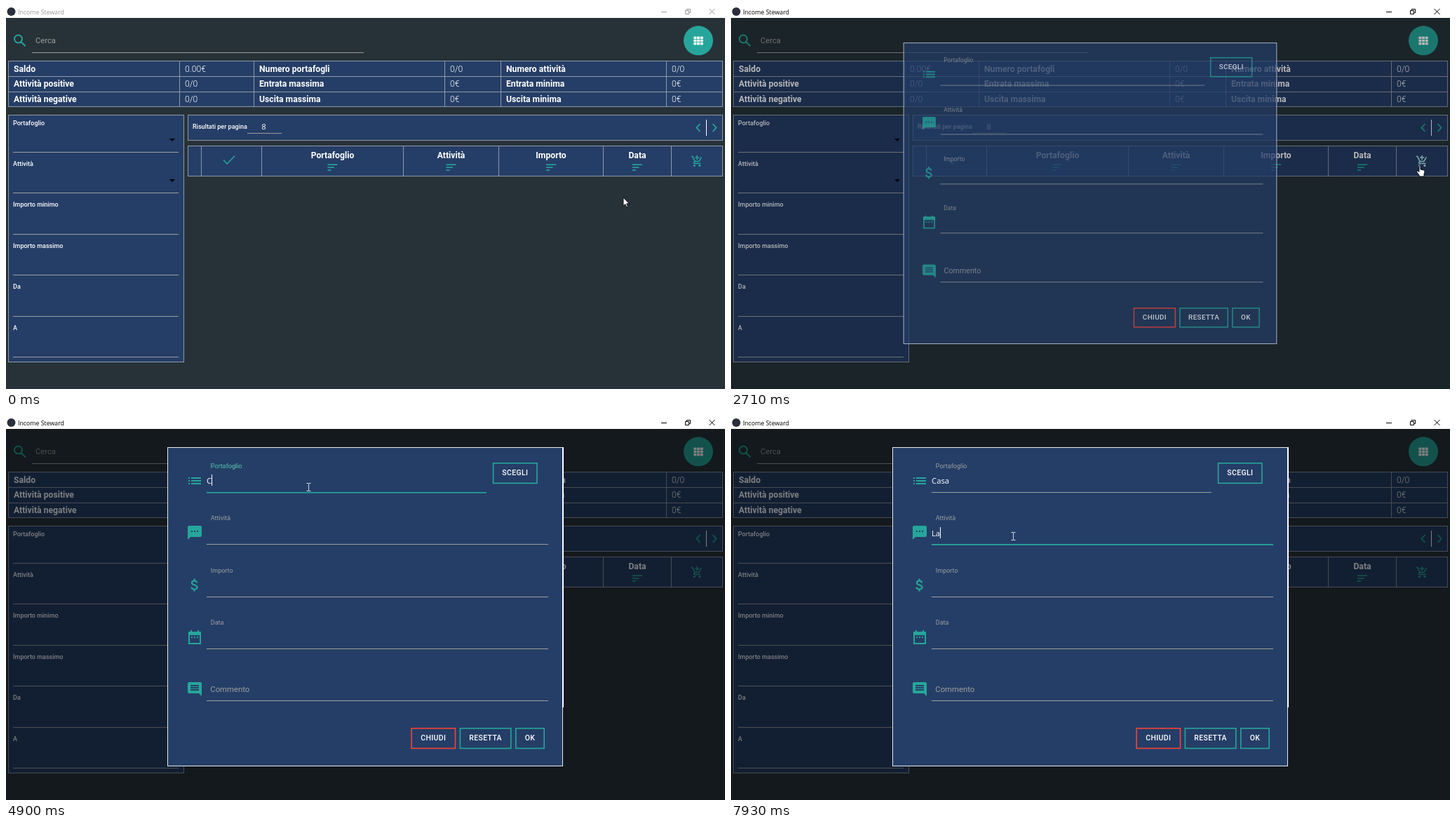
An HTML page with a canvas that plays this animation: 1025 px wide and 546 px high, repeating every 8000 ms.

```html
<!DOCTYPE html>
<html lang="it">
<head>
<meta charset="utf-8">
<title>Income Steward</title>
<style>
  html, body { margin: 0; width: 100%; height: 100%; overflow: hidden; background: #263238; }
  canvas { display: block; }
</style>
</head>
<body>
<canvas id="stage" width="1025" height="546"></canvas>
<script>
const ctx = document.getElementById('stage').getContext('2d');
const LOOP = 8000;
const BG = '#263238', BLUE = '#253e67', TEAL = '#26a69a', EDGE = '#9199a7', GREY = '#9e9e9e';
const ROBOTO = 'Roboto, sans-serif', OPEN = '"Open Sans", sans-serif';

const clamp = v => Math.max(0, Math.min(1, v));
const ramp = (t, from, to) => clamp((t - from) / (to - from));

function rect(x, y, w, h, color) {
  ctx.fillStyle = color;
  ctx.fillRect(x, y, w, h);
}
function text(s, x, y, font, color, align = 'left', spacing = 0) {
  ctx.font = font;
  ctx.fillStyle = color;
  ctx.textAlign = align;
  ctx.letterSpacing = spacing + 'px';
  ctx.fillText(s, x, y);
  ctx.letterSpacing = '0px';
}
function stroke(d, x, y, width, color) {
  ctx.save();
  ctx.translate(x, y);
  ctx.lineWidth = width;
  ctx.strokeStyle = color;
  ctx.stroke(new Path2D(d));
  ctx.restore();
}
function fill(d, x, y, color, outline) {
  ctx.save();
  ctx.translate(x, y);
  const path = new Path2D(d);
  ctx.fillStyle = color;
  ctx.fill(path);
  if (outline) {
    ctx.strokeStyle = outline;
    ctx.lineWidth = 0.9;
    ctx.stroke(path);
  }
  ctx.restore();
}
function disc(x, y, r, color) {
  ctx.fillStyle = color;
  ctx.beginPath();
  ctx.arc(x, y, r, 0, 7);
  ctx.fill();
}
// Blue box with a one pixel edge and inner column lines
function panel(x, y, right, bottom, columns = [], edge = EDGE) {
  rect(x, y, right - x, bottom - y, BLUE);
  ctx.strokeStyle = edge;
  ctx.lineWidth = 1;
  ctx.strokeRect(x + 0.5, y + 0.5, right - x - 1, bottom - y - 1);
  for (const c of columns) rect(c, y, 1, bottom - y, edge);
}

function titleBar(active) {
  const ink = active ? '#000' : '#999';
  rect(0, 0, 1025, 17, '#fff');
  disc(7.5, 8, 6, '#2b2e3b');
  text('Income Steward', 17, 12, '8.8px ' + OPEN, ink);
  rect(934, 8, 8, 1, ink);
  stroke('M968.500 6.500h5v5h-5zM970.500 6v-1.500h5v5h-1.500', 0, 0, 1, ink);
  stroke('M1002.500 4l8 8m0-8l-8 8', 0, 0, 1, ink);
}

function summary() {
  const rows = [
    ['Saldo', '0.00€', 'Numero portafogli', '0/0', 'Numero attività', '0/0'],
    ['Attività positive', '0/0', 'Entrata massima', '0€', 'Entrata minima', '0€'],
    ['Attività negative', '0/0', 'Uscita massima', '0€', 'Uscita minima', '0€']
  ];
  const xs = [11, 255, 361, 633, 713, 949];
  panel(3, 78, 1022, 144, [247, 353, 625, 705, 941]);
  rows.forEach((row, r) => {
    if (r) rect(3, 78 + r * 22, 1019, 1, EDGE);
    row.forEach((s, c) => text(s, xs[c], 93.5 + r * 21.7, (c % 2 ? '300' : '700') + ' 12.2px ' + ROBOTO, '#fff'));
  });
}

function filters() {
  panel(3, 155, 254, 508);
  ['Portafoglio', 'Attività', 'Importo minimo', 'Importo massimo', 'Da', 'A'].forEach((s, i) => {
    const y = i * 58.4;
    text(s, 10, 169.5 + y, '500 9px ' + ROBOTO, '#fff');
    rect(10, Math.round(208 + y), 236, 1, GREY);
    if (i < 2) fill('M0 0h8l-4 4z', 233, Math.round(189 + y), '#000');
  });
}

function cart(color) {
  ctx.save();
  ctx.translate(976, 212.3);
  ctx.scale(0.76, 0.76);
  stroke('M1 3H3.600L8 12H15.600L20.300 3.900M7.600 12L6 15.200Q6 16 7 16H19M12 1V9M8 5H16', 0, 0, 2, color);
  disc(7, 20, 2, color);
  disc(17, 20, 2, color);
  ctx.restore();
}

function page(hover) {
  rect(0, 17, 1025, 529, BG);
  stroke('M15 9.500a5.500 5.500 0 1 1-11 0a5.500 5.500 0 1 1 11 0M13.600 13.600L19.700 19.700', 8, 37.5, 2, TEAL);
  text('Cerca', 42, 53, '11.2px ' + ROBOTO, GREY);
  rect(37, 66, 473, 1, GREY);
  disc(987, 49.3, 21, TEAL);
  for (let i = 0; i < 9; i++) rect(980.4 + (i % 3) * 4.7, 43.6 + (i / 3 | 0) * 4.2, 3.9, 3.4, '#fff');

  summary();
  filters();

  panel(259, 155, 1022, 192);
  text('Risultati per pagina', 266, 174.8, '500 9px ' + ROBOTO, '#fff');
  text('8', 367.5, 175.5, '11.3px ' + OPEN, '#fff', 'center');
  rect(344, 181, 49, 1, GREY);
  stroke('M989.500 168l-5 5.500l5 5.500M1007.500 168l5 5.500l-5 5.500', 0, 0, 1.8, TEAL);
  rect(998, 162, 1, 23, '#fff');

  panel(259, 199, 1022, 243, [278, 364, 566, 702, 851, 948]);
  stroke('M310 219.500l5.300 5.500l11-11.500', 0, 0, 1.5, TEAL);
  [['Portafoglio', 465.5], ['Attività', 634.5], ['Importo', 777], ['Data', 900]].forEach(([s, x]) => {
    text(s, x, 216.5, '700 12.2px ' + ROBOTO, '#fff', 'center');
    [14, 9.5, 5].forEach((w, i) => rect(x - 7, 225.4 + i * 3.9, w, 1.6, TEAL));
  });
  cart(`rgb(${38 + 140 * hover},${166 + 69 * hover},${154 + 88 * hover})`);
}

const bubble = 'M20 2H4Q2 2 2 4V22L6 18H20Q22 18 22 16V4Q22 2 20 2z';

function modalIcons() {
  const x = 257;
  for (let i = 0; i < 3; i++) {
    rect(x + 3, 86 + i * 4, 2, 2, TEAL);
    rect(x + 7, 86 + i * 4, 14, 2, TEAL);
  }
  fill(bubble, x, 153, TEAL);
  stroke('M15 9C15 5 8 5 8 9C8 13 15.500 11 15.500 15.300C15.500 19 7.500 19 7.500 15M11.500 3V6M11.500 18V21', x, 227.5, 2.2, TEAL);
  stroke('M4 5H20V21H4z', x, 302, 2, TEAL);
  fill('M3 4H21V9H3zM6 2H8V5H6zM16 2H18V5H16z', x, 302, TEAL);
  for (let i = 0; i < 3; i++) {
    rect(x + 7 + i * 4, 162, 2, 2, BLUE);
    rect(x + 7 + i * 4, 313, 2, 2, TEAL);
  }
  ctx.save();
  ctx.translate(x + 24, 376);
  ctx.scale(-1, 1);
  fill(bubble, 0, 0, TEAL);
  for (let i = 0; i < 3; i++) rect(6, 6 + i * 3, 12, 2, BLUE);
  ctx.restore();
}

function button(s, x, y, w, color) {
  ctx.strokeStyle = color;
  ctx.lineWidth = 1.6;
  ctx.strokeRect(x + 0.8, y + 0.8, w - 1.6, 28.6);
  text(s, x + w / 2, y + 18.2, '500 10.5px ' + ROBOTO, '#fff', 'center', 0.35);
}

const TYPING = [[4900, 'C'], [5200, 'Ca'], [5350, 'Cas'], [5520, 'Casa']];
const TYPING2 = [[7760, 'L'], [7930, 'La']];
const CARET = [[4130, 4580], [4900, 5990], [6520, 7540], [7760, LOOP]];
const typed = (t, steps) => steps.reduce((s, [at, v]) => t >= at ? v : s, '');

function field(value, y, caret) {
  text(value, 286, y, '11.3px ' + OPEN, '#fff');
  if (caret) rect(286 + Math.round(ctx.measureText(value).width), y - 13, 1, 16, '#fff');
}

function modal(t) {
  const p = 1 - (1 - ramp(t, 2631, 2861)) ** 3;
  if (!p) return;
  const size = 0.8 + 0.2 * p;
  const focused = ramp(t, 4070, 4350), moved = ramp(t, 6940, 7220);
  const first = focused * (1 - moved);
  const dx = t >= 4130 ? 0.8 : 0;

  ctx.save();
  ctx.globalAlpha = p;
  ctx.translate(512, 270.5 - 12.5 * (1 - p));
  ctx.scale(size, size);
  ctx.translate(-512, -270.5);

  panel(230, 43, 794, 498, [], '#e8ebf0');
  if (dx) rect(793, 43, 2, 371, '#fff');
  modalIcons();

  ['Portafoglio', 'Attività', 'Importo', 'Data'].forEach((s, i) => {
    text(s, 291 + dx, 73 + i * 74.3, '9px ' + ROBOTO, GREY);
  });
  text('Commento', 291.3, 391.5, '11.3px ' + ROBOTO, GREY);
  [107, 181, 256, 330, 404].forEach((y, i) => rect(286, y, i ? 487 : 399, 1, GREY));

  if (first) {
    ctx.globalAlpha = first;
    text('Portafoglio', 291 + dx, 73, '9px ' + ROBOTO, TEAL);
    rect(286, 107, 399, 1.6, TEAL);
  }
  if (moved) {
    ctx.globalAlpha = moved;
    rect(286, 181, 487, 1.8, TEAL);
  }
  ctx.globalAlpha = p;

  const caret = CARET.some(([a, b]) => t >= a && t < b);
  field(typed(t, TYPING), 95, caret && t < 7000);
  field(typed(t, TYPING2), 170, caret && t >= 7000);

  button('SCEGLI', 693 + dx, 65, 64, TEAL);
  button('CHIUDI', 577.3, 443, 64, '#f44336');
  button('RESETTA', 646.6, 443, 74, TEAL);
  button('OK', 726, 443, 42, TEAL);
  ctx.restore();
}

// Pointer legs: first step, last step, step count, end point
const LEGS = [
  [1290, 2080, 11, 976, 228],
  [2160, 2240, 2, 981, 227],
  [2950, 3170, 4, 484, 122],
  [3420, 3870, 7, 431, 100],
  [6290, 6290, 1, 421, 116],
  [6368, 6680, 5, 402, 170]
];
function pointerAt(t) {
  let x = 880, y = 273;
  for (const [from, to, n, ex, ey] of LEGS) {
    if (t < from) break;
    const gap = (to - from) / (n - 1) || 1;
    const k = Math.min(n, Math.floor((t - from) / gap + 0.001) + 1) / n;
    const e = k * k * (3 - 2 * k);
    x += (ex - x) * e;
    y += (ey - y) * e;
  }
  return [Math.round(x), Math.round(y)];
}

function pointer(t) {
  const [x, y] = pointerAt(t);
  const open = t >= 2800;
  const inField = open && x < 685 && (y < 108 || y > 152);
  if (inField) {
    stroke('M-3-5.500h2.500l.5.500l.5-.5h2.500M-3 5.500h2.500l.5-.5l.5.500h2.500M0-5v10', x + 0.5, y, 1, '#d8dee8');
  } else if (!open && x > 970 && y < 240) {
    fill('M0 1Q1-.5 2 1V6L6.500 7Q8 7.500 8 9L7 13V16H0V14L-3.500 9.500Q-3.500 7.500-2 8L0 9.500z', x, y, '#fff', '#000');
  } else {
    fill('M0 0V12L2.800 9.500L4.800 14L6.600 13.200L4.700 8.800H8.500z', x, y, '#fff', '#000');
  }
}

function draw(t) {
  const hover = ramp(t, 2000, 2240) * (1 - ramp(t, 2900, 3170));
  page(hover);
  const shade = 1 - (1 - ramp(t, 2631, 2861)) ** 2;
  rect(0, 17, 1025, 529, `rgba(0,0,0,${shade / 2})`);
  modal(t);
  titleBar(t >= 2560);
  pointer(t);
}

const start = performance.now();
function frame() {
  draw((performance.now() - start) % LOOP);
  requestAnimationFrame(frame);
}
frame();
</script>
</body>
</html>
```
